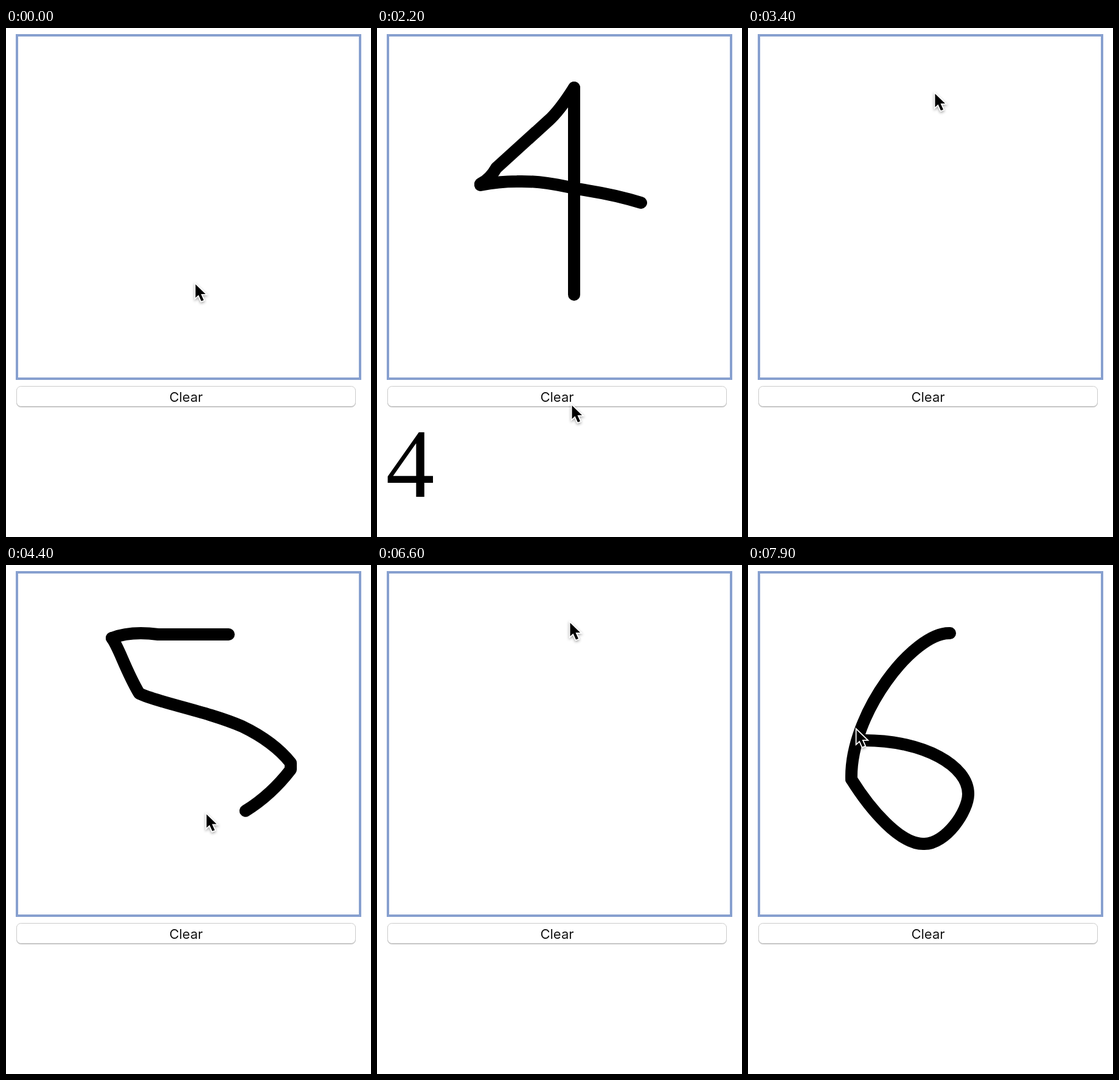
Animation, 600 px wide and 836 px high, one loop 8000 ms. Source, as an HTML page:

```html
<!DOCTYPE html>
<html lang="en">
<head>
<meta charset="utf-8">
<title>Handwritten digits</title>
<style>
  html, body { margin: 0; width: 100%; height: 100%; overflow: hidden; background: #fff; }
  svg { display: block; width: 100%; height: 100%; }
  #ink { fill: none; stroke: #000; stroke-width: 20; stroke-linecap: round; stroke-linejoin: round; }
  #button rect { fill: #fff; stroke: #cbcbcb; filter: drop-shadow(0 1px .5px rgba(0, 0, 0, .25)); }
  #button text { font: 22px Inter, sans-serif; text-anchor: middle; fill: #141414; }
  #button.pressed rect { fill: url(#blue); stroke: #2a7fe8; }
  #button.pressed text { fill: #fff; }
  #digit { font: 160px "Liberation Serif", serif; }
  #cursor { filter: drop-shadow(0 2px 2px rgba(0, 0, 0, .35)); }
</style>
</head>
<body>
<svg viewBox="0 0 600 836">
  <defs>
    <linearGradient id="blue" x2="0" y2="1">
      <stop stop-color="#6cb3fa"/>
      <stop offset="1" stop-color="#087eff"/>
    </linearGradient>
  </defs>
  <rect x="18" y="12" width="564" height="564" fill="#fff" stroke="#87a0cf" stroke-width="4"/>
  <g id="button">
    <rect x="17.5" y="588.5" width="557" height="33" rx="7"/>
    <text x="296" y="614">Clear</text>
  </g>
  <text id="digit" x="14.5" y="769.5"></text>
  <g id="ink"></g>
  <path id="cursor" d="M1.5 3V25L6.5 20.5L11 30.5L15 29L10.5 19H18Z"
        stroke="#fff" stroke-width="3.6" paint-order="stroke"/>
</svg>
<script>
const DURATION = 8000, STEP = 100;
const INK_LAG = 60;                  // ink trails the pointer slightly
const PEN_X = 14, PEN_Y = 20;        // pen position relative to the arrow tip
const CLEARS = [0, 2700, 5800];
const RESULTS = [["4", 1900, 2700], ["5", 5200, 5800]];
const PRESS = [2500, 2700];

const linear = p => p;
const easeOut = p => p * (2 - p);
const easeInOut = p => p * p * (3 - 2 * p);

const byId = id => document.getElementById(id);
const ink = byId("ink"), cursor = byId("cursor"), digit = byId("digit"), button = byId("button");

function leg(start, end, d, ease) {
  const path = document.createElementNS("http://www.w3.org/2000/svg", "path");
  path.setAttribute("d", d);
  const length = path.getTotalLength();
  const covered = t => length * ease(Math.min(1, Math.max(0, (t - start) / (end - start))));
  return { start, path, length, covered };
}

const move = (start, end, d) => leg(start, end, d, easeInOut);

function draw(start, end, d, ease = linear) {
  const stroke = leg(start, end, d, ease);
  ink.append(stroke.path);
  return { ...stroke, drawn: true };
}

const legs = [
  // 4
  draw(40, 480, "M324 438V98"),
  draw(480, 880, "M324 98Q300 136 282 152L196 230Q186 248 170 256"),
  draw(940, 1340, "M170 258Q200 252 230 252C270 251 300 258 324 263S380 270 434 287", easeOut),
  move(1550, 2200, "M434 287L333 637"),
  // 5
  move(2920, 3400, "M333 637L320 125"),
  move(3400, 3500, "M320 125L366 114"),
  draw(3500, 3800, "M366 114H250Q205 108 174 120"),
  draw(3820, 4600, "M174 120C186 136 196 172 219 211C250 226 330 240 388 265Q440 290 468 325V336" +
    "Q428 388 372 416C310 444 230 438 155 419"),
  move(4850, 5700, "M155 419L313 631"),
  // 6
  move(5940, 6600, "M313 631C250 450 250 330 330 112"),
  draw(6730, 7160, "M332 112C272 110 167 245 170 352"),
  draw(7160, 7490, "M170 352C200 400 250 460 290 458C325 458 362 405 362 376"),
  draw(7490, 7840, "M362 376C362 330 290 288 191 288", easeOut)
];

function render(t) {
  const current = legs.findLast(l => l.start <= t) || legs[0];
  const pen = current.path.getPointAtLength(current.covered(t));
  cursor.setAttribute("transform", `translate(${pen.x - PEN_X} ${pen.y - PEN_Y})`);

  const cleared = CLEARS.findLast(c => c <= t), inkTime = t - INK_LAG;
  for (const { start, path, length, covered, drawn } of legs) {
    if (!drawn) continue;
    path.style.display = start >= cleared && start <= inkTime ? "" : "none";
    path.style.strokeDasharray = `${covered(inkTime)} ${length + 50}`;
  }

  const result = RESULTS.find(([, from, to]) => t >= from && t < to);
  digit.textContent = result ? result[0] : "";
  button.classList.toggle("pressed", t >= PRESS[0] && t < PRESS[1]);
}

const begin = performance.now();
function tick() {
  const t = (performance.now() - begin) % DURATION;
  render(Math.floor(t / STEP) * STEP);
  requestAnimationFrame(tick);
}
tick();
</script>
</body>
</html>
```
